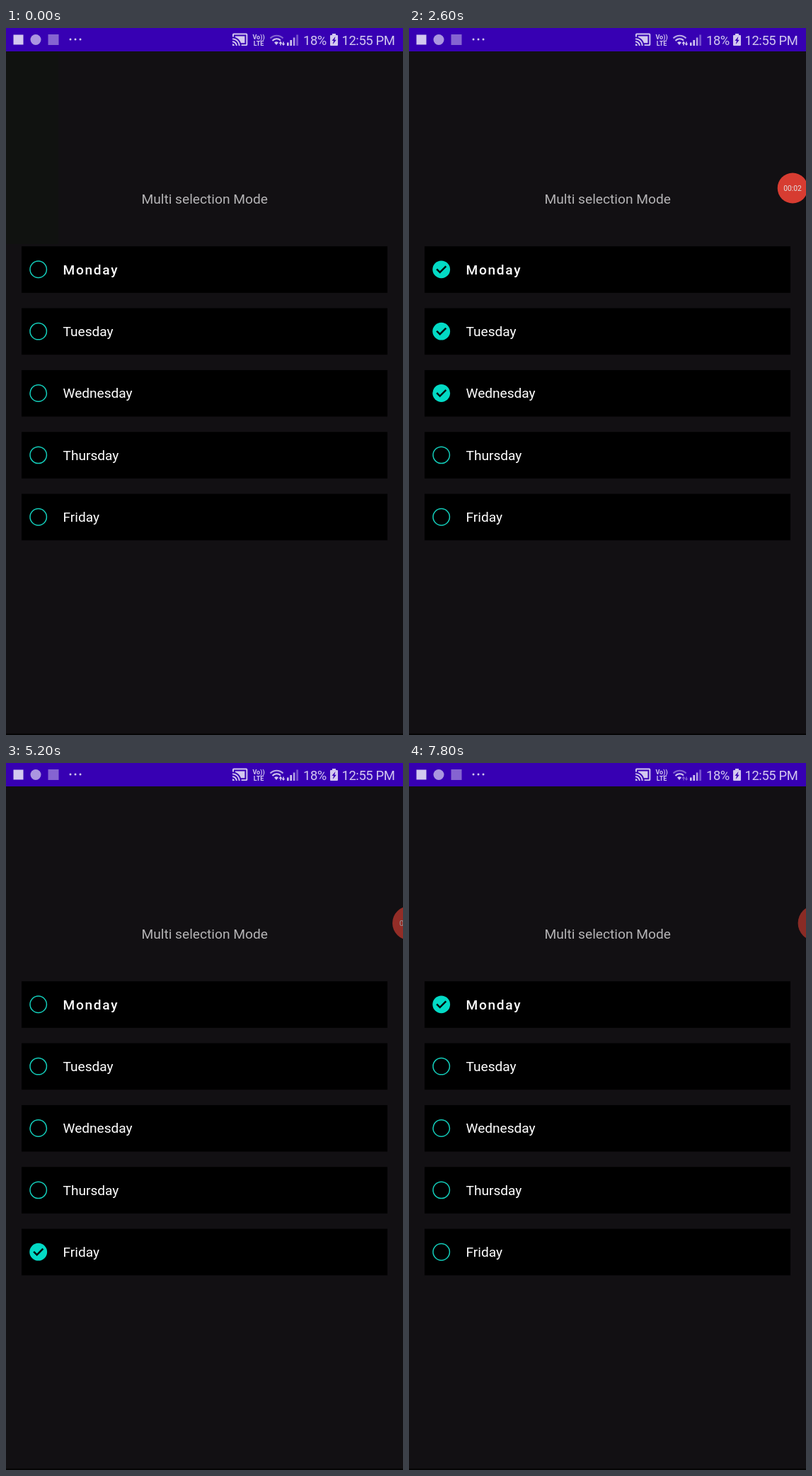
An HTML page that plays this animation: 561x998 px, repeating every 8 s.

```html
<!DOCTYPE html>
<html lang="en">
<head>
<meta charset="utf-8">
<title>Multi selection list</title>
<style>
html, body { margin: 0; width: 100%; height: 100%; overflow: hidden; background: #121013; }
svg { display: block; width: 561px; height: 998px; font-family: Roboto, "Noto Sans", sans-serif; }
.status { fill: #d3c8ef; }
.line { fill: none; stroke: #d3c8ef; }
.clock { font-size: 18.4px; letter-spacing: -.4px; }
.tiny { font-size: 9px; font-weight: 700; text-anchor: middle; }
.title { font-size: 19.2px; fill: #b5b4b6; text-anchor: middle; }
.day { font-size: 19.1px; fill: #fff; }
.first { font-weight: 500; letter-spacing: 1.7px; }
</style>
</head>
<body>
<svg viewBox="0 0 561 998">
  <rect width="561" height="998" fill="#121013"/>
  <rect id="tint" y="33" width="74" height="272" fill="#101210"/>
  <rect y="996" width="561" height="2" fill="#050505"/>
  <rect width="561" height="33" fill="#3700b3"/>

  <g class="status">
    <rect x="10.5" y="9.5" width="14" height="14"/>
    <circle cx="42" cy="16.5" r="7.5" opacity=".75"/>
    <rect x="59.5" y="9" width="15" height="15" opacity=".5"/>
    <circle cx="91" cy="16" r="1.5"/><circle cx="98" cy="16" r="1.5"/><circle cx="105" cy="16" r="1.5"/>
    <path transform="translate(319 4.7) scale(.97)" d="M21 3H3c-1.1 0-2 .9-2 2v3h2V5h18v14h-7v2h7c1.1 0 2-.9 2-2V5c0-1.1-.9-2-2-2zM1 18v3h3c0-1.66-1.34-3-3-3zm0-4v2c2.76 0 5 2.24 5 5h2c0-3.87-3.13-7-7-7zm0-4v2c4.97 0 9 4.03 9 9h2c0-6.08-4.93-11-11-11zM19 7H5v1.63c3.96 1.28 7.09 4.41 8.37 8.37H19V7z"/>
    <text class="tiny" x="357" y="16">Vo))</text>
    <text class="tiny" x="357" y="25">LTE</text>
    <g class="line" stroke-width="2">
      <path id="outer" d="M373.5 14.5A12.5 12.5 0 0 1 391.5 14.5"/>
      <path d="M376.5 18A8 8 0 0 1 388 17.5"/>
    </g>
    <path d="M379 20.5A4.5 4.5 0 0 1 385 20.5L382 24z"/>
    <path id="arrows" d="M388 18.5l2.5 3.5h-1.7v2.5h-1.6V22h-1.7zM392 25l-2.3-3h1.5v-2.5h1.6V22h1.5z"/>
    <rect x="397" y="20.5" width="2.6" height="4.5"/>
    <rect x="401.4" y="17" width="2.6" height="8"/>
    <rect x="405.8" y="13.5" width="2.6" height="11.5" opacity=".8"/>
    <rect x="410.2" y="9.5" width="2.8" height="15.5" opacity=".4"/>
    <text class="clock" x="420" y="24">18%</text>
    <path d="M461 8h5v2h2q1 0 1 1v13q0 1-1 1h-9q-1 0-1-1V11q0-1 1-1h2z"/>
    <path d="M465.5 12l-5 6h2.6l-1.3 5 5-6.2h-2.6z" fill="#3700b3"/>
    <text class="clock" x="474.5" y="24">12:55 PM</text>
  </g>

  <text class="title" x="280.7" y="248">Multi selection Mode</text>
  <g id="list"></g>
  <g id="bubble">
    <circle r="25" fill="#f44336"/>
    <text id="count" y="4.6" font-size="12" fill="#fff" text-anchor="middle"></text>
  </g>
</svg>
<script>
const $ = id => document.getElementById(id);
const LOOP = 8000, STEP = 100;
const days = ["Monday", "Tuesday", "Wednesday", "Thursday", "Friday"];

// Times at which each row's tick flips
const taps = [
  [1500, 5200, 6700],
  [2200, 4900, 6500, 7000],
  [2500, 4600, 6200, 7500],
  [2900, 4200, 5900, 7800],
  [3800, 5600]
];

$("list").innerHTML = days.map((day, i) => `
  <g transform="translate(0 ${308.2 + i * 87.35})">
    <rect x="22" width="517" height="65.6"/>
    <circle class="ring" cx="45.7" cy="32.6" r="11.7" fill="none" stroke="#13cdba" stroke-width="1.5"/>
    <g class="tick">
      <circle cx="45.7" cy="32.6" r="12.4" fill="#03dac5"/>
      <path transform="translate(33.5 20.8) scale(1.02)" d="M10 17l-5-5 1.41-1.41L10 14.17l7.59-7.59L19 8z" stroke="#000" stroke-width=".5"/>
    </g>
    <text class="day${i ? "" : " first"}" x="80.5" y="39.6">${day}</text>
  </g>`).join("");
const rings = document.querySelectorAll(".ring");
const ticks = document.querySelectorAll(".tick");

const show = (el, on) => el.setAttribute("visibility", on ? "visible" : "hidden");
const mix = (a, b, p) => a + (b - a) * p;
const ease = (t, start) => {
  const p = Math.min(1, Math.max(0, (t - start) / 500));
  return (1 - Math.cos(Math.PI * p)) / 2;
};

function draw(t) {
  taps.forEach((times, i) => {
    const on = times.filter(x => x <= t).length % 2 === 1;
    show(ticks[i], on);
    show(rings[i], !on);
  });

  // The bubble shrinks to the edge, then slides half out of view
  const shrink = ease(t, 2300), hide = ease(t, 4830);
  const x = mix(mix(533.6, 546.6, shrink), 574.6, hide);
  const scale = mix(mix(1, .78, shrink), 1, hide);
  $("bubble").setAttribute("transform", `translate(${x} 226) scale(${scale})`);
  $("bubble").setAttribute("opacity", mix(mix(1, .81, shrink), .53, hide));
  show($("bubble"), t >= 400);
  $("count").textContent = "00:0" + Math.max(0, Math.floor((t - 200) / 1000));
  $("count").setAttribute("opacity", t < 5300 ? 1 : 0);

  show($("tint"), t < 100);
  $("outer").setAttribute("opacity", t < 1500 || t >= 6500 ? .5 : .85);
  $("arrows").setAttribute("opacity", t < 6500 ? 1 : .45);
}

const begin = performance.now();
function tick() {
  const t = (performance.now() - begin) % LOOP;
  draw(Math.floor(t / STEP) * STEP);
  requestAnimationFrame(tick);
}
tick();
</script>
</body>
</html>
```
